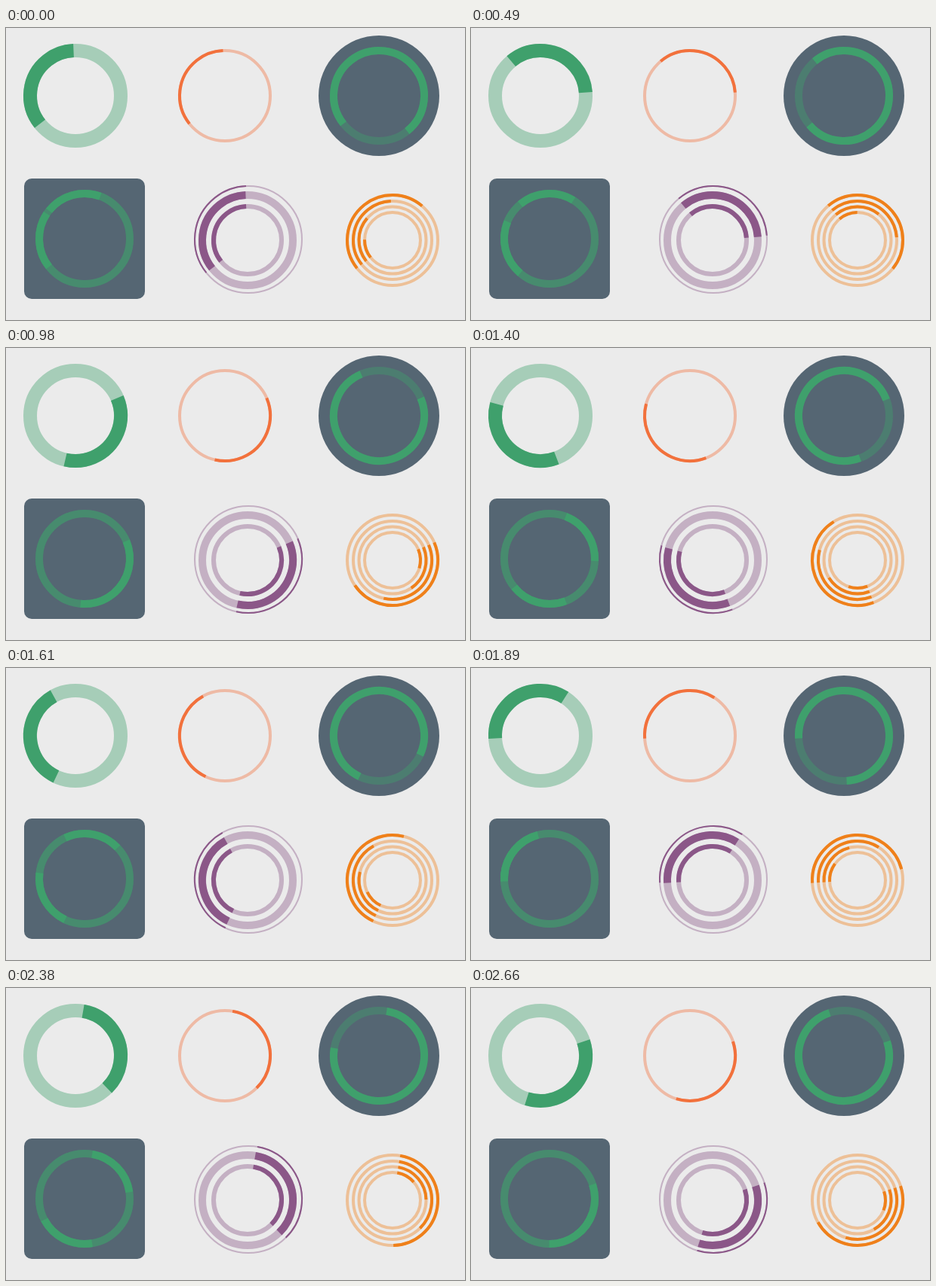
An HTML page with a canvas for the animation above (2.73 s loop, 608 by 388 pixels).

```html
<!DOCTYPE html>
<html lang="en">
<head>
<meta charset="utf-8">
<title>Ring loaders</title>
<style>
  html, body { margin: 0; width: 100%; height: 100%; overflow: hidden; background: #ebebeb; }
  canvas { display: block; }
</style>
</head>
<body>
<canvas id="stage" width="608" height="388"></canvas>
<script>
const ctx = document.getElementById('stage').getContext('2d');
const LOOP = 2730, STEP = 70, TRACK_ALPHA = 0.4;
const GREEN = '#3fa06c', RED = '#f2713c', PURPLE = '#8b5788', ORANGE = '#ef801a', SLATE = '#556673';

// Time in ms and the clockwise angle from the top where every arc begins.
const spin = [[0, 231.6], [490, 319.8], [980, 427], [1400, 519.2], [1890, 626.6], [2380, 729.7], [2660, 791.6]];

function spinAngle(t) {
  let i = 1;
  while (i < spin.length - 1 && t > spin[i][0]) i++;
  const [t0, a0] = spin[i - 1], [t1, a1] = spin[i];
  return a0 + (a1 - a0) * (t - t0) / (t1 - t0);
}

function strokeArc(x, y, radius, from, sweep) {
  const start = (from - 90) * Math.PI / 180;
  ctx.beginPath();
  ctx.arc(x, y, radius, start, start + sweep * Math.PI / 180);
  ctx.stroke();
}

// A translucent full track with an opaque arc covering `share` of the turn.
function ring(x, y, outer, width, color, angle, share) {
  const radius = outer - width / 2;
  ctx.strokeStyle = color;
  ctx.lineWidth = width;
  ctx.globalAlpha = TRACK_ALPHA;
  strokeArc(x, y, radius, 0, 360);
  ctx.globalAlpha = 1;
  strokeArc(x, y, radius, angle, share * 360);
}

function panel(x, y, size, corner) {
  ctx.fillStyle = SLATE;
  ctx.beginPath();
  ctx.roundRect(x, y, size, size, corner);
  ctx.fill();
}

function draw(t) {
  const a = spinAngle(t);
  ctx.fillStyle = '#ebebeb';
  ctx.fillRect(0, 0, 608, 388);

  ring(92, 90, 69, 18, GREEN, a, 0.35);
  ring(290, 90, 62, 4, RED, a, 0.35);

  panel(414, 10, 160, 80);
  ring(494, 90, 65, 10, GREEN, a, 0.75);

  // Two arcs share this ring and turn in opposite directions.
  panel(24, 200, 160, 10);
  ring(104, 280, 65, 10, GREEN, a, 0.2);
  ring(104, 280, 65, 10, GREEN, 180 - a, 0.2);

  ring(321, 281, 72, 2, PURPLE, a, 0.35);
  ring(320, 282, 65, 10, PURPLE, a, 0.35);
  ring(320, 282, 48, 6, PURPLE, a, 0.35);

  const nested = [[62, 0.47], [54, 0.35], [46.5, 0.22], [39, 0.11]];
  for (const [outer, share] of nested) ring(512, 282, outer, 4, ORANGE, a, share);
}

function tick() {
  const t = performance.now() % LOOP;
  draw(Math.floor(t / STEP) * STEP);
  requestAnimationFrame(tick);
}
tick();
</script>
</body>
</html>
```
